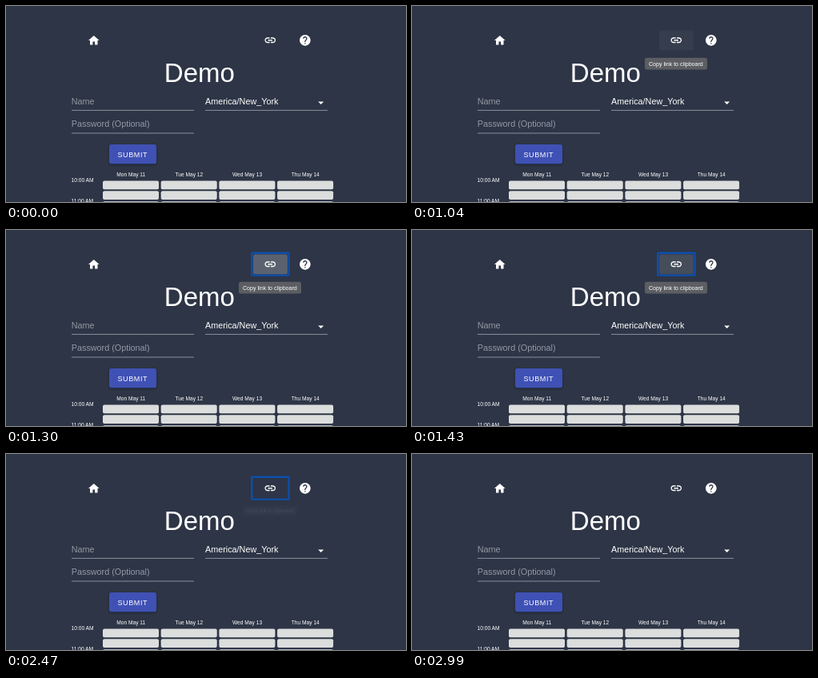
These frames come from a looping animation (500 px wide and 245 px high, 3120 ms). An HTML page:

```html
<!DOCTYPE html>
<html lang="en">
<head>
<meta charset="utf-8">
<title>Demo</title>
<style>
  html, body { margin: 0; width: 100%; height: 100%; overflow: hidden; background: #2d3546; }
  svg { display: block; width: 100%; height: 100%; }
  text { font-family: "Liberation Sans", Arial, sans-serif; fill: #fff; }
  .title { font-size: 33px; }
  .field { font-size: 10.8px; }
  .hint { fill: #9499a3; }
  .line { stroke: #a3a7af; stroke-width: .8; }
  .submit { font-size: 9px; letter-spacing: .6px; }
  .small { font-size: 6.65px; }
  .days { text-anchor: middle; }
  .icon { fill: #fff; }
  .cells { fill: #dcdedd; }
  .button { fill: #3f51b5; filter: drop-shadow(0 1.5px 1.5px rgba(0, 0, 0, .35)); }
  .tip rect { fill: #5c5e63; }
  .tip text { font-size: 7.1px; }

  .hover, .ripple, .ring, .tip { opacity: 0; animation: 3120ms step-end infinite; }
  .hover { fill: #fff; animation-name: hover; }
  .ripple { fill: #fff; transform-origin: 331px 49px; animation-name: ripple; }
  .ring { fill: none; stroke: #0d4fac; stroke-width: 2.4; animation-name: ring; }
  .tip { transform-origin: 330px 65px; animation-name: tip; }

  @keyframes hover {
    0% { opacity: 0; }
    25% { opacity: .05; }
    79.16%, 100% { opacity: 0; }
  }
  @keyframes ripple {
    0% { opacity: 0; transform: scale(1); }
    37.5% { opacity: .25; transform: scale(1); }
    41.66% { opacity: .19; transform: scale(1.5); }
    45.83% { opacity: .08; transform: scale(1.6); }
    50% { opacity: .03; transform: scale(1.6); }
    54.16%, 100% { opacity: 0; transform: scale(1.6); }
  }
  @keyframes ring {
    0% { opacity: 0; }
    37.5% { opacity: 1; }
    95.83%, 100% { opacity: 0; }
  }
  @keyframes tip {
    0% { opacity: 0; transform: none; }
    29.16% { opacity: .6; transform: scale(.95); }
    33.33% { opacity: 1; transform: none; }
    79.16% { opacity: .12; transform: scale(.86); }
    83.33%, 100% { opacity: 0; transform: none; }
  }
</style>
</head>
<body>
<svg viewBox="0 0 500 245" preserveAspectRatio="none">
  <defs>
    <clipPath id="area"><rect x="309" y="30.5" width="42.8" height="24.7" rx="2"/></clipPath>
    <g id="row">
      <rect x="121" width="70" height="10.8" rx="2"/>
      <rect x="193.7" width="70" height="10.8" rx="2"/>
      <rect x="266.4" width="70" height="10.8" rx="2"/>
      <rect x="339.1" width="70" height="10.8" rx="2"/>
    </g>
  </defs>

  <rect class="hover" x="309" y="30.5" width="42.8" height="24.7" rx="2"/>
  <g clip-path="url(#area)"><circle class="ripple" cx="331" cy="49" r="19"/></g>
  <rect class="ring" x="307.2" y="28.8" width="46.4" height="27.8" rx=".5"/>

  <path class="icon" transform="translate(101.6 34.9) scale(.68)" d="M10 20v-6h4v6h5v-8h3L12 3 2 12h3v8z"/>
  <path class="icon" transform="translate(322.1 34.6) scale(.68)" d="M3.9 12c0-1.71 1.39-3.1 3.1-3.1h4V7H7c-2.76 0-5 2.24-5 5s2.24 5 5 5h4v-1.9H7c-1.71 0-3.1-1.39-3.1-3.1zM8 13h8v-2H8v2zm9-6h-4v1.9h4c1.71 0 3.1 1.39 3.1 3.1s-1.39 3.1-3.1 3.1h-4V17h4c2.76 0 5-2.24 5-5s-2.24-5-5-5z"/>
  <path class="icon" transform="translate(365.7 34.7) scale(.68)" d="M12 2C6.48 2 2 6.48 2 12s4.48 10 10 10 10-4.48 10-10S17.52 2 12 2zm1 17h-2v-2h2v2zm2.07-7.75l-.9.92C13.45 12.9 13 13.5 13 15h-2v-.5c0-1.1.45-2.1 1.17-2.83l1.24-1.26c.37-.36.59-.86.59-1.41 0-1.1-.9-2-2-2s-2 .9-2 2H8c0-2.21 1.79-4 4-4s4 1.79 4 4c0 .88-.36 1.68-.93 2.25z"/>

  <text class="title" x="197.8" y="95">Demo</text>

  <text class="field hint" x="81.8" y="123">Name</text>
  <text class="field" x="249" y="123">America/New_York</text>
  <path class="icon" d="M390.2 119.5h7l-3.5 3.5z"/>
  <text class="field hint" x="81.8" y="151.3">Password (Optional)</text>
  <path class="line" d="M82 130.4h153M249 130.4h153M82 159h153"/>

  <rect class="button" x="129" y="173" width="59" height="24.3" rx="2.7"/>
  <text class="submit" x="139.5" y="188.5">SUBMIT</text>

  <g class="small days">
    <text x="156.2" y="213">Mon May 11</text>
    <text x="228.8" y="213">Tue May 12</text>
    <text x="301.5" y="213">Wed May 13</text>
    <text x="374.3" y="213">Thu May 14</text>
  </g>
  <g class="small">
    <text x="81.5" y="220">10:00 AM</text>
    <text x="81.5" y="246">11:00 AM</text>
  </g>
  <g class="cells">
    <use href="#row" y="218.5"/>
    <use href="#row" y="231.3"/>
    <use href="#row" y="244.2"/>
  </g>

  <g class="tip">
    <rect x="291" y="64.7" width="78" height="14.8" rx="2.5"/>
    <text x="296" y="74.5">Copy link to clipboard</text>
  </g>
</svg>
</body>
</html>
```
